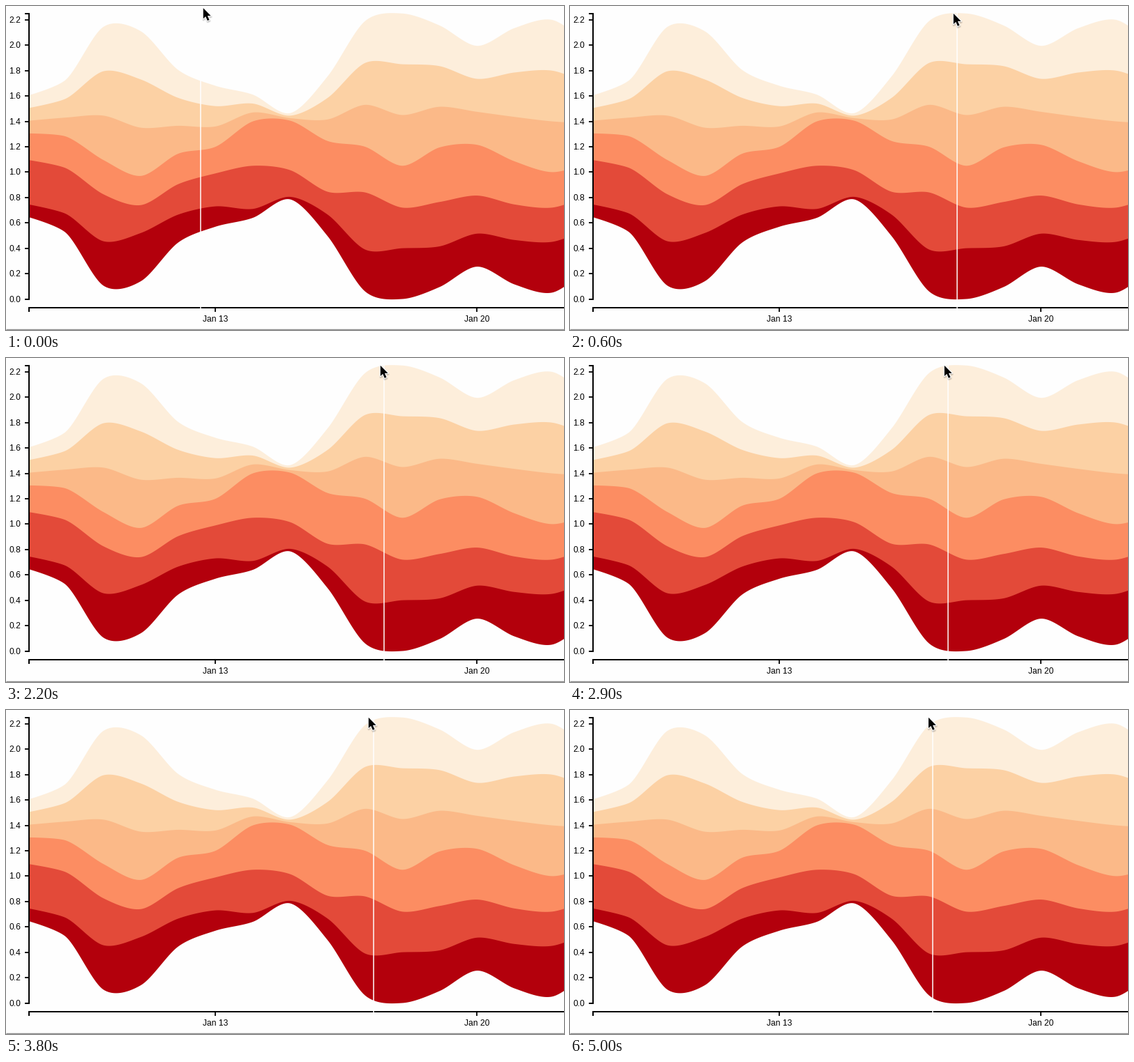
A matplotlib script that plays this animation: 800x465 px, repeating every 5100 ms.

```python
import numpy as np
import matplotlib
import matplotlib.pyplot as plt
from matplotlib.animation import FuncAnimation
from matplotlib.patches import Polygon

W, H, DPI = 800, 465, 100
FRAMES, STEP = 51, 100          # 51 frames of 100 ms
PX = 72 / DPI                   # points per pixel

matplotlib.rcParams["font.family"] = "Liberation Sans"

X0, DAY = 32.6, 53.57           # first day and pixels per day
Y0, UNIT = 420.5, 182.1         # zero line and pixels per unit

COLORS = ["#b3000c", "#e34a39", "#fc8d62", "#fbb988", "#fcd1a4", "#fdeedb"]
SHARED = [.10, .15, .35, .38, .22, .16, .07, .02, .17, .33, .40, .32, .26,
          .35, .40, .32, .30]
SECOND = [.35, .36, .37, .22, .24, .26, .34, .21, .18, .45, .32, .35, .30,
          .28, .27, .26, .26]
THIRD = [.21, .25, .27, .23, .24, .21, .35, .39, .40, .36, .33, .43, .40,
         .34, .28, .26, .25]


def cardinal(x, y, slack=0.15, n=24):
    """Sample a cardinal spline with quadratic end pieces."""
    p = np.column_stack([x, y])
    tan = slack * (p[2:] - p[:-2])
    t = np.linspace(0, 1, n)[:, None]
    s = 1 - t

    def quad(a, c, b):
        return s * s * a + 2 * s * t * c + t * t * b

    parts = [quad(p[0], p[1] - tan[0] * 2 / 3, p[1])]
    for i in range(1, len(p) - 2):
        a, b = p[i], p[i + 1]
        parts.append(s**3 * a + 3 * s * s * t * (a + tan[i - 1])
                     + 3 * s * t * t * (b - tan[i]) + t**3 * b)
    parts.append(quad(p[-2], p[-2] + tan[-1] * 2 / 3, p[-1]))
    return np.vstack(parts)


fig = plt.figure(figsize=(W / DPI, H / DPI), dpi=DPI, facecolor="#fefefe")
ax = fig.add_axes([0, 0, 1, 1])
ax.set_xlim(0, W)
ax.set_ylim(H, 0)
ax.axis("off")


def stroke(xs, ys, color="black", width=2.0, z=5):
    return ax.plot(xs, ys, color=color, lw=width * PX, zorder=z,
                   solid_capstyle="butt", solid_joinstyle="miter")[0]


def label(x, y, text, align):
    ax.text(x, y, text, fontsize=12 * PX, ha=align, va="baseline",
            color="black", zorder=6)


def draw_stream():
    layers = np.array([SHARED, SECOND, THIRD, SHARED, SHARED, SHARED])
    total = layers.sum(axis=0)
    base = (total.max() - total) / 2
    bounds = np.vstack([base, base + layers.cumsum(axis=0)])
    days = X0 + DAY * np.arange(layers.shape[1])
    edges = [cardinal(days, Y0 - UNIT * b) for b in bounds]
    # Upper bands first, each tucked a pixel under the one below
    for i in reversed(range(len(COLORS))):
        low = edges[i] + ([0, 1] if i else [0, 0])
        ax.add_patch(Polygon(np.vstack([edges[i + 1], low[::-1]]),
                             fc=COLORS[i], ec="none", zorder=2))


def draw_axes():
    top = Y0 - UNIT * 2.25
    stroke([26.5, 32.7, 32.7, 26.5], [top, top, Y0, Y0])
    for k in range(12):
        y = Y0 - UNIT * k / 5
        stroke([26.5, 32.7], [y, y], width=1.8)
        label(21.3, y + 4, f"{k / 5:.1f}", "right")
    stroke([32.7, 32.7, W + 5], [439, 432.5, 432.5])
    for day in (13, 20):
        x = X0 + DAY * (day - 8)
        stroke([x, x], [432.5, 439], width=1.8)
        label(x, 452.5, f"Jan {day}", "center")
    stroke([0, W], [464.2, 464.2], color="#8c8c8c", width=1.4)


draw_stream()
draw_axes()

guide = stroke([0, 0], [10, 434], color="white", width=1.5, z=8)

ARROW = np.array([(0, 0), (0, 15.2), (3.4, 12), (6, 18), (8.7, 16.9),
                  (6.1, 11), (10.8, 11)])
shadows = [Polygon(ARROW, fc="black", ec="black", lw=w * PX, alpha=0.07,
                   joinstyle="round", zorder=9) for w in (1, 2.5, 4)]
rim = Polygon(ARROW, fc="white", ec="white", lw=2.4 * PX, joinstyle="round",
              zorder=10)
arrow = Polygon(ARROW, fc="black", ec="none", zorder=11)
for part in (*shadows, rim, arrow):
    ax.add_patch(part)


def pose(ms):
    """Guide x and pointer tip at a time."""
    if ms < 600:
        k = 1 - (1 - ms / 600) ** 2
        return 278.6 + 276 * k, 282.8 + 267 * k, 3 + 7.8 * min(1, 1.5 * k)
    times = [1800, 2200, 3100, 3800, 4200]
    line = np.interp(ms, times, [554.6, 541.6, 541.6, 527.2, 519.6])
    tip = np.interp(ms, times, [549.8, 536.8, 536.8, 519.8, 514])
    return line, tip, 10.8


def update(i):
    line, x, y = pose(i * STEP)
    guide.set_xdata([line, line])
    for part in shadows:
        part.set_xy(ARROW + [x + 0.4, y + 1.6])
    rim.set_xy(ARROW + [x, y])
    arrow.set_xy(ARROW + [x, y])
    return [guide, *shadows, rim, arrow]


anim = FuncAnimation(fig, update, frames=FRAMES, interval=STEP, repeat=True,
                     repeat_delay=0, blit=False)
plt.show()
```
